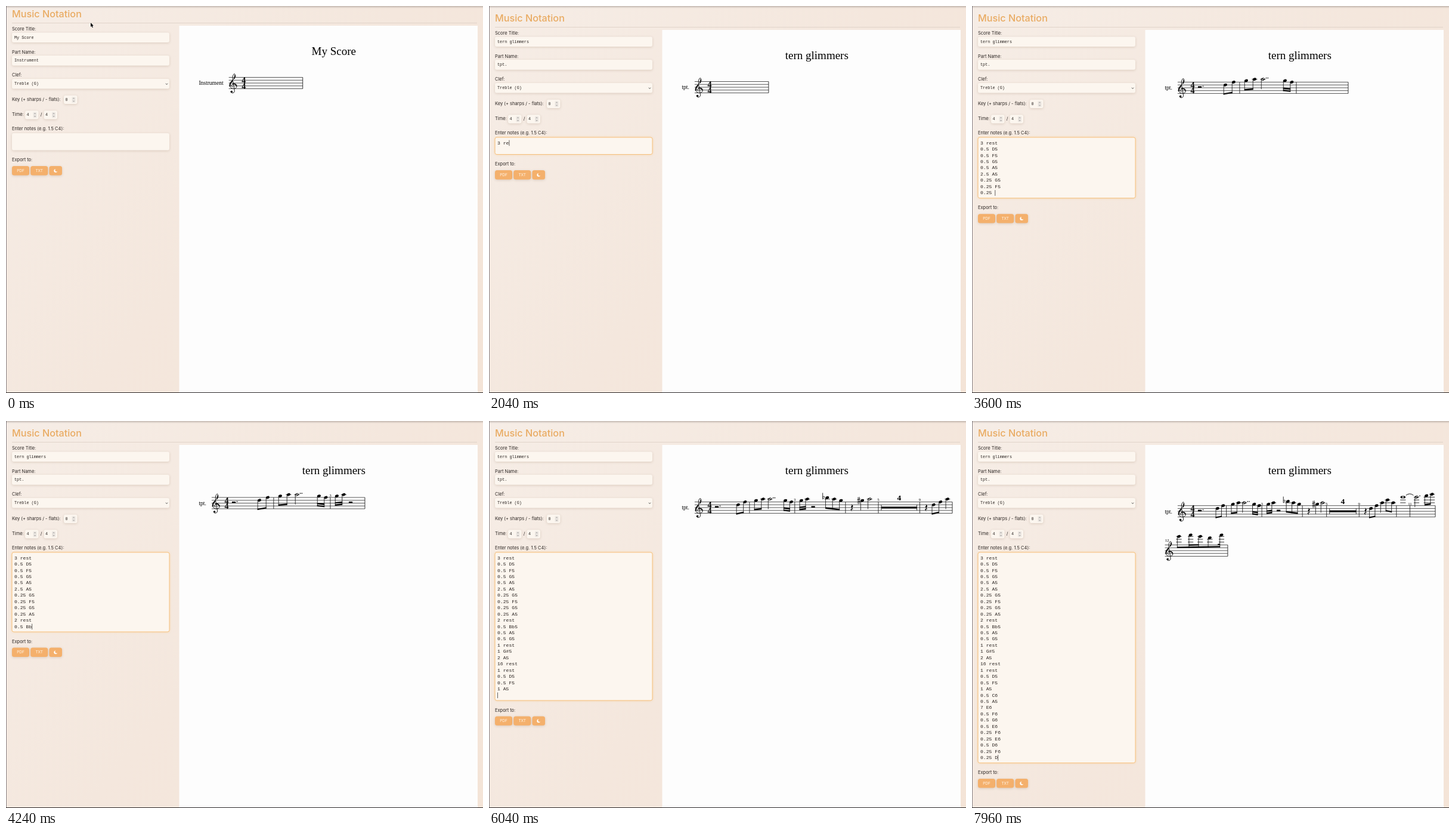
Animation, 800 px wide and 648 px high, one loop 8 s. Source, as an HTML page with a canvas:

```html
<!DOCTYPE html>
<html lang="en">
<head>
<meta charset="utf-8">
<title>Music Notation</title>
<style>
  html, body { margin: 0; width: 100%; height: 100%; overflow: hidden; background: #f5e9e0; }
  canvas { display: block; width: 800px; height: 648px; }
</style>
</head>
<body>
<canvas id="stage"></canvas>
<script>
const W = 800, H = 648, LOOP = 8000;
const canvas = document.getElementById('stage');
const dpr = window.devicePixelRatio || 1;
canvas.width = W * dpr;
canvas.height = H * dpr;
const c = canvas.getContext('2d');

const SANS = 'Inter, sans-serif';
const MONO = '"Liberation Mono", monospace';
const SERIF = '"Liberation Serif", serif';
const INK = '#2b2522', ORANGE = '#f4b06c', FIELD = '#fcf6ef';

const SCRIPT = ['3 rest', '0.5 D5', '0.5 F5', '0.5 G5', '0.5 A5', '2.5 A5', '0.25 G5', '0.25 F5',
  '0.25 G5', '0.25 A5', '2 rest', '0.5 Bb5', '0.5 A5', '0.5 G5', '1 rest', '1 G#5', '2 A5',
  '16 rest', '1 rest', '0.5 D5', '0.5 F5', '1 A5', '0.5 C6', '0.5 A5', '7 E6', '0.5 F6',
  '0.5 G6', '0.5 E6', '0.25 F6', '0.25 E6', '0.5 D6', '0.25 F6', '0.25 D6'].join('\n');
// time in ms, characters typed
const PACE = [[1920, 0], [2960, 39], [4240, 87], [5280, 126], [6800, 185], [7960, 232], [8000, 233]];
const LINE = 10.45;

const lerp = (a, b, k) => a + (b - a) * k;
const clamp = (v, a, b) => Math.min(b, Math.max(a, v));
const ease = k => k * k * (3 - 2 * k);
const sum = list => list.reduce((a, b) => a + b, 0);

function typedCount(t) {
  if (t <= PACE[0][0]) return 0;
  const i = PACE.findIndex(p => t <= p[0]);
  const [t0, n0] = PACE[i - 1], [t1, n1] = PACE[i];
  return Math.floor(lerp(n0, n1, (t - t0) / (t1 - t0)) + 0.01);
}

// Old text is erased from t0, new text is typed from t1.
function edit(t, before, t0, eraseStep, after, t1, typeStep) {
  if (t >= t1) return after.slice(0, 1 + Math.floor((t - t1) / typeStep));
  return before.slice(0, before.length - clamp(Math.ceil((t - t0) / eraseStep), 0, before.length));
}

function text(s, x, y, font, color = INK, align = 'left', base = 'middle') {
  c.font = font;
  c.fillStyle = color;
  c.textAlign = align;
  c.textBaseline = base;
  c.fillText(s, x, y);
}

function line(x1, y1, x2, y2, width = 0.8, color = '#000') {
  c.strokeStyle = color;
  c.lineWidth = width;
  c.beginPath();
  c.moveTo(x1, y1);
  c.lineTo(x2, y2);
  c.stroke();
}

function poly(points, color) {
  c.fillStyle = color;
  c.beginPath();
  points.forEach(([x, y]) => c.lineTo(x, y));
  c.fill();
}

function dot(x, y, r, color = '#000') {
  c.fillStyle = color;
  c.beginPath();
  c.arc(x, y, r, 0, 7);
  c.fill();
}

// ---------- form ----------

function box(x, y, w, h, fill, focus, r = 3) {
  c.save();
  c.shadowColor = focus ? 'rgba(246,180,90,.5)' : 'rgba(120,80,50,.22)';
  c.shadowBlur = 4 * dpr;
  c.shadowOffsetY = focus ? 0 : dpr;
  c.fillStyle = fill;
  c.beginPath();
  c.roundRect(x, y, w, h, r);
  c.fill();
  c.restore();
  if (focus) {
    c.strokeStyle = '#f6bd74';
    c.lineWidth = 0.9;
    c.stroke();
  }
}

function chevron(x, y, d, size = 1.6, color = '#777') {
  c.strokeStyle = color;
  c.lineWidth = 0.8;
  c.beginPath();
  c.moveTo(x - size, y - d * size / 2);
  c.lineTo(x, y + d * size / 2);
  c.lineTo(x + size, y - d * size / 2);
  c.stroke();
}

function textField(value, y, focus) {
  box(10, y, 264, 16.6, FIELD, focus);
  text(value, 14, y + 8.4, '6.8px ' + MONO);
  if (focus) caret(14 + c.measureText(value).width, y + 8.3);
}

function caret(x, y) {
  line(x + 0.5, y - 4.8, x + 0.5, y + 4.8, 0.7, '#222');
}

function numberField(value, x, y) {
  box(x, y, 22.5, 14.2, FIELD);
  text(value, x + 2.5, y + 7.2, '6.8px ' + MONO);
  c.fillStyle = '#ece7e2';
  c.fillRect(x + 13.5, y + 2.5, 6, 9.5);
  chevron(x + 16.5, y + 5, -1, 1.3);
  chevron(x + 16.5, y + 9.5, 1, 1.3);
}

function button(label, x, y, w) {
  box(x, y, w, 15.3, ORANGE, false, 3.5);
  if (label) return text(label, x + w / 2, y + 7.9, '6.5px ' + SANS, '#fff6ea', 'center');
  dot(x + w / 2, y + 7.7, 2.9, '#fff');
  dot(x + w / 2 + 1.6, y + 6.6, 2.5, ORANGE);
}

function form(title, part, notes, focus) {
  text('Music Notation', 10, 20.8, '500 16.2px ' + SANS, '#e9ab62');
  line(10, 35.5, 790, 35.5, 0.9, '#dfd2c8');
  const label = (s, y, x = 10) => text(s, x, y, '7.5px ' + SANS);
  label('Score Title:', 45.6);
  textField(title, 51.4, focus === 'title');
  label('Part Name:', 84.4);
  textField(part, 90.1, focus === 'part');
  label('Clef:', 123.2);
  box(10, 129, 264, 16.6, FIELD, focus === 'clef');
  text('Treble (G)', 14, 137.4, '6.8px ' + MONO);
  chevron(269.5, 137.6, 1, 1.7, '#222');
  label('Key (+ sharps / - flats):', 163.7);
  numberField('0', 97, 156.8);
  label('Time:', 189.2);
  numberField('4', 32, 182.2);
  label('/', 189.2, 57.7);
  numberField('4', 63.5, 182.2);
  label('Enter notes (e.g. 1.5 C4):', 212.7);

  const rows = notes.split('\n');
  const h = Math.max(2, rows.length) * LINE + 7.6;
  box(10, 220, 264, h, FIELD, focus === 'notes');
  rows.forEach((row, i) => text(row, 14, 229.5 + i * LINE, '8.1px ' + MONO));
  if (focus === 'notes') {
    caret(14 + c.measureText(rows[rows.length - 1]).width, 229.4 + (rows.length - 1) * LINE);
  }
  const bottom = 220 + h;
  label('Export to:', bottom + 16.5);
  button('PDF', 10, bottom + 26.6, 29);
  button('TXT', 41.2, bottom + 26.6, 29);
  button('', 72.5, bottom + 26.6, 21.5);
}

// ---------- music model ----------

const SP = 4.75;
const TOP_LINE = 38; // F5 counted in scale steps

function parse(notes) {
  return notes.split('\n')
    .map(s => s.match(/^([\d.]+) (?:rest|([A-G])([#b]?)(\d))$/))
    .filter(Boolean)
    .map(([, d, letter, acc, octave]) => ({
      d: +d, acc, rest: !letter,
      up: letter ? 'CDEFGAB'.indexOf(letter) + 7 * octave - TOP_LINE : 0
    }));
}

function toMeasures(items) {
  const list = [];
  let no = 1, cur, left;
  const open = () => { cur = { no: no++, notes: [], multi: 0 }; left = 4; list.push(cur); };
  open();
  for (const item of items) {
    if (item.rest && item.d > 4) {
      cur.multi = item.d / 4;
      no += cur.multi - 1;
      open();
      continue;
    }
    for (let d = item.d; d > 0;) {
      const part = Math.min(d, left);
      cur.notes.push({ ...item, d: part, tied: d > part });
      d -= part;
      left -= part;
      if (!left) open();
    }
  }
  return list;
}

// duration: tightest and natural space after the note
const SPACE = { 0.25: [8.5, 11.5], 0.5: [9.5, 14], 1: [9, 16], 2: [11, 28], 2.5: [17, 37], 3: [17, 43], 4: [16, 40] };

function gaps(m, s) {
  if (m.multi) return [lerp(55, 87, s)];
  if (!m.notes.length) return [lerp(50, 87, s)];
  return m.notes.map((n, i) => {
    const [tight, wide] = SPACE[n.d];
    const next = m.notes[i + 1];
    const base = n.rest && n.d === 3 ? 30 : tight;
    return lerp(base, wide, s) + (!next ? -4 : next.acc ? 5 : 0);
  });
}

const pad = (m, i) => i && m.notes.length ? 11 : 0;
const rowWidth = (row, s) => sum(row.map((m, i) => pad(m, i) + sum(gaps(m, s))));

function lift(row) {
  const notes = row.flatMap(m => m.notes).filter(n => !n.rest);
  const high = Math.max(0, ...notes.map(n => n.up));
  return Math.max(
    high > 1 ? high * 2.375 - 3.8 : 0,
    row.some(m => m.no === 3 && m.notes.length) ? 1.5 : 0,
    notes.some(n => n.acc === 'b') ? 9 : 0,
    notes.some(n => n.tied) ? (high > 6 ? 14 : 12.5) : 0);
}

// ---------- engraving ----------

const CLEF = new Path2D('M1.2 .5C.55 .2 .75-.75 1.5-.75C2.3-.75 2.6-.2 2.6 .1C2.6 .75 2 1 1.5 1C.6 1 .1 .4 .1-.3' +
  'C.1-1.3 1.1-1.9 1.6-2.55C2-3.1 2.1-3.5 2-3.9C1.9-4.45 1.55-4.3 1.3-3.7C1.05-3 1.15-2.3 1.25-1.7' +
  'L1.8 1.6C1.9 2.3 1.4 2.5 1.05 2.5C.7 2.5 .5 2.3 .5 2');
const CLEF_BOLD = new Path2D('M1.1-.58C1.7-.9 2.5-.55 2.5 .1M.25 .2C.05-.5 .4-1.1 1.1-1.8M1.6-2.5C2-2.95 2.05-3.4 1.95-3.8');
const FLAT = new Path2D('M-1.6-8V2.4C.6 1.2 2-.6 1.2-1.8C.4-2.8-1-1.6-1.6-.6');
const SHARP = new Path2D('M-1-5.6V6M1.1-6V5.6M-2.5-1.2L2.5-2.6M-2.5 2.6L2.5 1.2');
const QUARTER_REST = new Path2D('M-1.4-6.4L1.9-2.6C.2-1-.2 .4 1.9 3C-.6 2-2 3.2 .2 6.2C-3.6 4-2.6 1.2 .2 1.8L-1.9-1.2C-.2-2.8 0-4-1.4-6.4Z');
const FLAG = new Path2D('M0 0C.4-4 5-5.5 3.4-11.5C6.8-6 2.2-3.6 .6 0Z');

function at(x, y, draw, scale = 1) {
  c.save();
  c.translate(x, y);
  c.scale(scale, scale);
  c.strokeStyle = c.fillStyle = '#000';
  draw();
  c.restore();
}

function clef(x, top) {
  at(x, top + 3 * SP, () => {
    c.lineWidth = 0.19;
    c.stroke(CLEF);
    c.lineWidth = 0.36;
    c.stroke(CLEF_BOLD);
    dot(0.78, 2.02, 0.36);
  }, SP);
}

function head(x, y, d) {
  at(x, y, () => {
    c.beginPath();
    c.ellipse(0, 0, d === 4 ? 4 : 3.1, 2.25, d === 4 ? 0 : -0.35, 0, 7);
    if (d >= 2) c.ellipse(0, 0, d === 4 ? 1.7 : 2.6, d === 4 ? 1.75 : 1.05, d === 4 ? 0.5 : -0.55, 0, 7);
    c.fill('evenodd');
  });
}

function rest(n, x, top) {
  const mid = top + 2 * SP;
  if (n.d === 1) return at(x, mid, () => c.fill(QUARTER_REST));
  c.fillStyle = '#000';
  c.fillRect(x - 3, mid - 2.6, 6.2, 2.6);
  if (n.d === 3) dot(x + 5.6, mid - 2.6, 0.8);
}

function note(n, top) {
  const { x, y } = n;
  for (let k = 2; k <= n.up; k += 2) line(x - 4.6, top - k * SP / 2, x + 4.6, top - k * SP / 2);
  head(x, y, n.d);
  const dots = n.d === 3 ? 1 : n.d === 2.5 ? 2 : 0;
  for (let k = 0; k < dots; k++) dot(x + 5.6 + k * 2.8, y - 2.2, 0.85);
  if (n.acc) at(x - 6, y, () => {
    c.lineWidth = 0.85;
    c.stroke(n.acc === 'b' ? FLAT : SHARP);
  });
  if (n.d >= 1 && n.d < 4) line(x - 2.7, y + 1, x - 2.7, y + 16.6);
}

function beamBar(x1, x2, yAt, off) {
  const a = yAt(x1) - off, b = yAt(x2) - off;
  poly([[x1, a], [x2, b], [x2, b - 2.4], [x1, a - 2.4]], '#000');
}

function beam(group) {
  const first = group[0], last = group[group.length - 1];
  if (first === last) {
    const end = first.y + 16.6;
    line(first.x - 2.7, first.y + 1, first.x - 2.7, end);
    at(first.x - 2.7, end, () => c.fill(FLAG));
    return;
  }
  const slope = clamp((last.y - first.y) / (last.x - first.x) * 0.5, -0.2, 0.2);
  const base = Math.max(...group.map(n => n.y + 16.3 - slope * (n.x - first.x)));
  const yAt = x => base + slope * (x + 2.7 - first.x);
  group.forEach((n, i) => {
    const x = n.x - 2.7;
    line(x, n.y + 1, x, yAt(x));
    if (n.d > 0.25) return;
    const prev = group[i - 1], next = group[i + 1];
    if (next && next.d === 0.25) beamBar(x - 0.4, next.x - 2.3, yAt, 3.6);
    else if (!prev || prev.d > 0.25) beamBar(x - 3.6, x + 0.4, yAt, 3.6);
  });
  beamBar(first.x - 3.1, last.x - 2.3, yAt, 0);
}

function beams(notes) {
  let group = [];
  const flush = () => { if (group.length) beam(group); group = []; };
  for (const n of notes) {
    if (n.rest || n.d > 0.5) flush();
    else group.push(n);
  }
  flush();
}

function multiRest(m, x, w, top) {
  const mid = top + 2 * SP;
  c.fillStyle = '#000';
  c.fillRect(x + 5, mid - 1.6, w - 10, 3.2);
  line(x + 5, mid - SP, x + 5, mid + SP);
  line(x + w - 5, mid - SP, x + w - 5, mid + SP);
  text(m.multi, x + w / 2, top - 3, 'bold 13.5px ' + SERIF, '#000', 'center', 'alphabetic');
}

function staffRow(row, left, top, second) {
  const wide = rowWidth(row, 1), tight = rowWidth(row, 0);
  const headWidth = second ? 23.5 : 37;
  const s = Math.min(1, (777 - left - headWidth - tight) / (wide - tight));
  let x = left + headWidth, tieFrom = null;

  clef(left + 1, top);
  if (second) text(row[0].no, left, top - 5.5, '7px ' + SERIF, '#000', 'left', 'alphabetic');
  else for (const k of [2, 4]) text('4', left + 25, top + k * SP, 'bold 14px ' + SERIF, '#000', 'center', 'alphabetic');

  row.forEach((m, i) => {
    const filled = m.notes.length > 0;
    const list = gaps(m, s), p = pad(m, i);
    const isLast = i === row.length - 1;
    const stretch = isLast && filled && s === 1 ? Math.max(second ? 1.4 : 1, (50 - p) / sum(list)) : 1;
    if (i && m.no % 2 && (filled || m.multi)) {
      text(m.no, x, top - 1.2, '6.8px ' + SERIF, '#000', 'center', 'alphabetic');
    }
    if (m.multi) multiRest(m, x, list[0], top);
    x += p;
    m.notes.forEach((n, k) => {
      n.x = x;
      n.y = top - n.up * SP / 2;
      if (n.rest) rest(n, x, top);
      else note(n, top);
      if (tieFrom) {
        c.lineWidth = 0.9;
        c.strokeStyle = '#000';
        c.beginPath();
        c.moveTo(tieFrom.x + 5, n.y - 3);
        c.quadraticCurveTo((tieFrom.x + n.x) / 2, n.y - 8, n.x - 5, n.y - 3);
        c.stroke();
      }
      tieFrom = n.tied ? n : null;
      x += list[k] * stretch;
    });
    if (!filled) x += list[0];
    beams(m.notes);
    line(x, top, x, top + 4 * SP);
  });
  for (let k = 0; k < 5; k++) line(left, top + k * SP, x, top + k * SP, 0.75, '#222');
}

function score(title, part, notes) {
  text(title, 549.8, 89, '19px ' + SERIF, '#000', 'center', 'alphabetic');
  const rows = [[]];
  for (const m of toMeasures(parse(notes))) {
    const row = rows[rows.length - 1];
    if (row.length && rowWidth([...row, m], 0) > 423) rows.push([m]);
    else row.push(m);
  }
  const top = 126.5 + lift(rows[0]);
  text(part, 323.4, top + 2 * SP + 3.3, '9.5px ' + SERIF, '#000', 'left', 'alphabetic');
  staffRow(rows[0], 332.5 + c.measureText(part).width, top, false);
  if (rows[1]) staffRow(rows[1], 323.5, top + 53 + lift(rows[1]), true);
}

// ---------- scene ----------

function backdrop() {
  const g = c.createLinearGradient(0, 0, W, H);
  g.addColorStop(0, '#f6ede6');
  g.addColorStop(0.5, '#f4e7dd');
  g.addColorStop(1, '#f4e4d7');
  c.fillStyle = g;
  c.fillRect(0, 0, W, H);
}

function edges() {
  const g = c.createLinearGradient(0, 0, 0, 4);
  g.addColorStop(0, 'rgba(120,110,105,.4)');
  g.addColorStop(1, 'rgba(120,110,105,0)');
  c.fillStyle = g;
  c.fillRect(0, 0, W, 4);
  c.fillStyle = '#6d6870';
  c.fillRect(0, 0, 0.8, H);
  c.fillStyle = '#2a2729';
  c.fillRect(0, 647, W, 1);
}

function pointer(x, y) {
  const shape = [[0, 0], [0, 7], [1.6, 5.6], [2.8, 8.2], [3.9, 7.7], [2.8, 5.2], [4.8, 5]];
  c.lineWidth = 1;
  c.strokeStyle = '#fff';
  poly(shape.map(([a, b]) => [x + a, y + b]), '#000');
  c.closePath();
  c.stroke();
  c.fill();
}

const FOCUS = [[1880, 'notes'], [1640, 'numbers'], [1540, 'clef'], [880, 'part'], [200, 'title']];

function draw(t) {
  c.setTransform(dpr, 0, 0, dpr, 0, 0);
  const title = edit(t, 'My Score', 200, 15, 'tern glimmers', 360, 30);
  const part = edit(t, 'Instrument', 1060, 20, 'tpt.', 1300, 30);
  const notes = SCRIPT.slice(0, typedCount(t));
  const focus = (FOCUS.find(f => t >= f[0]) || [])[1];

  backdrop();
  c.save();
  c.translate(0, -7 * (1 - ease(clamp((t - 60) / 160, 0, 1))));
  c.fillStyle = '#fdfdfd';
  c.fillRect(290.5, 40, 500.5, H);
  form(title, part, notes, focus);
  score(title, part, notes);
  c.restore();
  edges();
  if (t < 340) {
    const k = ease(clamp(t / 180, 0, 1));
    pointer(lerp(142, 118, k), lerp(28, 57, k));
  }
}

function tick() {
  draw(performance.now() % LOOP);
  requestAnimationFrame(tick);
}
tick();
</script>
</body>
</html>
```
